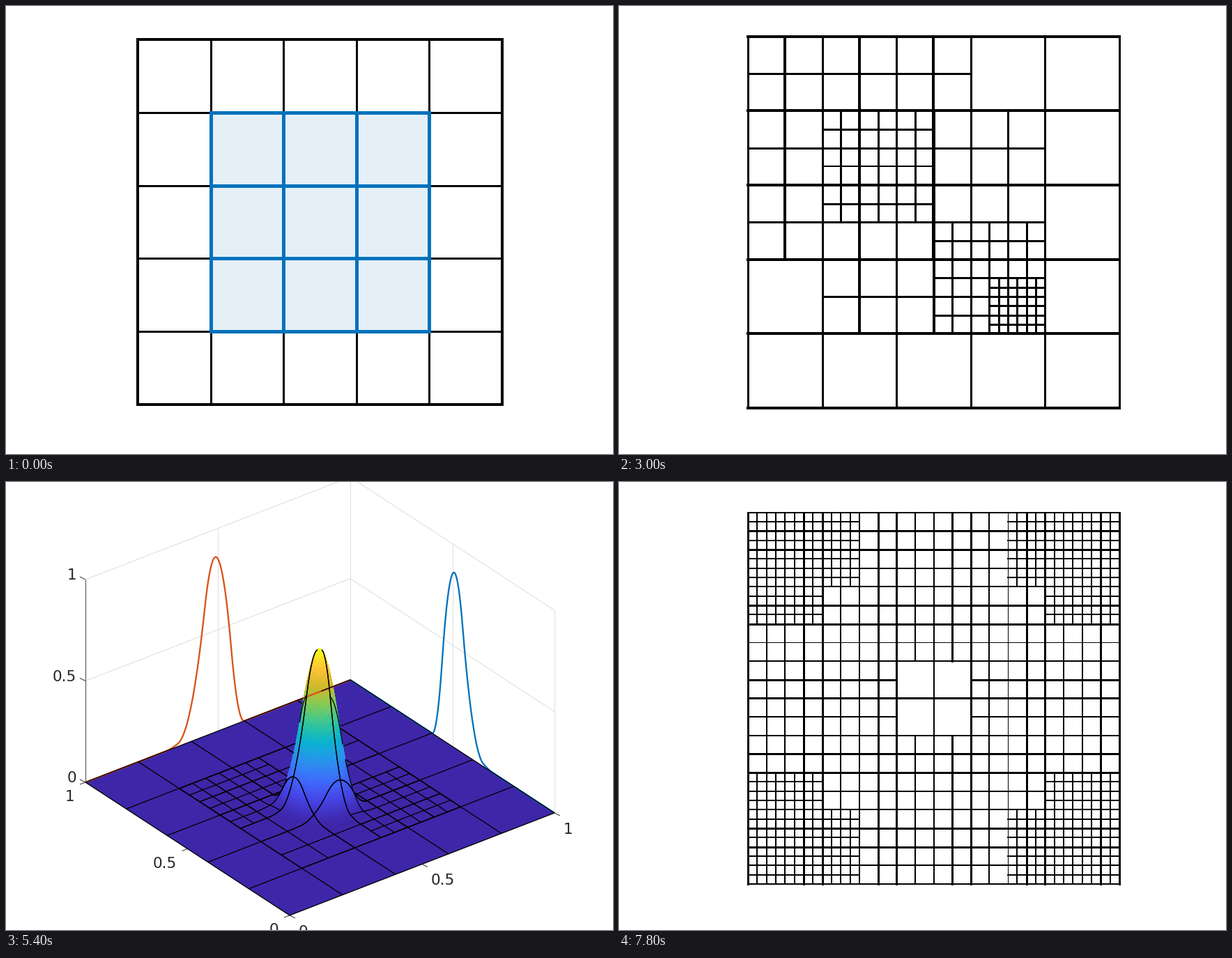
Recreate the animation shown at these times as a matplotlib script. Size 871 by 643 pixels, loop 8000 ms.

```python
import numpy as np
import matplotlib.pyplot as plt
from matplotlib.animation import FuncAnimation
from matplotlib.collections import LineCollection, PolyCollection
from matplotlib.colors import LinearSegmentedColormap
from matplotlib.patches import Rectangle

W, H, DPI = 871, 643, 64
PX = 72 / DPI                      # points per pixel
BLUE, ORANGE, INK = "#0072BD", "#D95319", "#262626"
PARULA = LinearSegmentedColormap.from_list("parula", [
    "#3E26A8", "#4746EB", "#3E70FF", "#2797EB", "#08B5D0",
    "#37C897", "#81CC59", "#D0BA27", "#FEC338", "#F9FB15"])

fig = plt.figure(figsize=(W / DPI, H / DPI), dpi=DPI, facecolor="white")
ax = fig.add_axes([0, 0, 1, 1])
ax.set_xlim(0, W)
ax.set_ylim(H, 0)
ax.axis("off")

# A mesh is a list of blocks: x0, y0, x1, y1, cell size (y runs down).
COARSE = [(0, 0, 1, 1, .2)]
ONCE = COARSE + [(.2, .2, .8, .8, .1)]
TWICE = ONCE + [(.2, .2, .5, .5, .05), (.5, .5, .8, .8, .05)]
THRICE = TWICE + [(0, 0, .6, .6, .1), (.65, .65, .8, .8, .025)]
TENTHS = [(0, 0, 1, 1, .1)]
RING = TENTHS + [(0, 0, 1, .4, .05), (0, .6, 1, 1, .05),
                 (0, .4, .4, .6, .05), (.6, .4, 1, .6, .05)]
CORNERS = RING + [
    (x, y, x + w, y + h, .025)
    for w, h in ((.3, .2), (.2, .3))
    for x in (0, 1 - w) for y in (0, 1 - h)]


def mesh_lines(blocks):
    """Yield (vertical, position, start, end) for every line of the blocks."""
    for x0, y0, x1, y1, step in blocks:
        for x in np.linspace(x0, x1, round((x1 - x0) / step) + 1):
            yield True, x, y0, y1
        for y in np.linspace(y0, y1, round((y1 - y0) / step) + 1):
            yield False, y, x0, x1


# Line weights, by position in fortieths of the square

def plain_width(vertical, k):
    return 4 if k in (0, 40) else 3


def mixed_width(vertical, k):
    if vertical:
        return 4 if k in (4, 12, 20) else 3
    return 2 if k == 14 else 4 if k % 8 == 0 else 3


def thin_width(vertical, k):
    if k == (28 if vertical else 14):
        return 1
    if k % 2:
        return 2
    return 3 if k // 2 % 4 in ((0, 3) if vertical else (1, 2)) else 2


def draw_mesh(blocks, width, box, marked=()):
    left, top, right, bottom = box

    def to_px(x, y):
        return left + x * (right - left), top + y * (bottom - top)

    def lines(parts, color, weight, z):
        segs, widths = [], []
        for vertical, p, a, b in mesh_lines(parts):
            ends = [(p, a), (p, b)] if vertical else [(a, p), (b, p)]
            segs.append([to_px(*e) for e in ends])
            widths.append(weight(vertical, round(p * 40)) * PX)
        return ax.add_collection(LineCollection(
            segs, colors=color, linewidths=widths, capstyle="projecting",
            zorder=z))

    out = [lines(blocks, "black", width, 2)]
    for block in marked:
        a, b = to_px(*block[:2]), to_px(*block[2:4])
        out.append(ax.add_patch(Rectangle(
            a, b[0] - a[0], b[1] - a[1], fc="#E5EFF8", ec="none", zorder=1)))
    if marked:
        out.append(lines(marked, BLUE, lambda v, k: 5, 3))
    return out


def spline(start, step, coefs):
    """Sum of quadratic B-splines on uniform knots."""
    def value(t):
        total = 0
        for i, c in enumerate(coefs):
            u = np.abs((t - start) / step - i - 1.5)
            total = total + c * np.where(
                u < .5, .75 - u ** 2, .5 * np.clip(1.5 - u, 0, None) ** 2)
        return total
    return value


class View:
    """Parallel projection of the unit cube."""

    def __init__(self, origin, ex, ey, rise, scale=1):
        mid = np.array([440, 320])
        self.o = mid + scale * (np.array(origin) - mid)
        self.ex, self.ey = scale * np.array(ex), scale * np.array(ey)
        self.rise = scale * rise
        toward = np.array([self.ey[0], -self.ex[0]])
        toward = toward / np.hypot(*toward)
        climb = -(self.ex[1] * toward[0] + self.ey[1] * toward[1]) / self.rise
        self.toward = toward[0], toward[1], -climb

    def __call__(self, x, y, z=0):
        x, y, z = np.broadcast_arrays(x, y, z)
        px = self.o[0] + self.ex[0] * x + self.ey[0] * y
        py = self.o[1] + self.ex[1] * x + self.ey[1] * y - self.rise * z
        return np.stack([px, py], -1)


def draw_surface(blocks, g, lo, hi, view):
    out = []
    dx, dy, dz = view.toward

    def line(pts, color, width, z):
        pts = np.asarray(pts)
        out.extend(ax.plot(pts[:, 0], pts[:, 1], color=color, lw=width * PX,
                           zorder=z, solid_capstyle="butt"))

    # walls
    for z in (.5, 1):
        line(view([0, 1, 1], [1, 1, 0], z), "#E2E2E2", 1.2, 1)
    for x, y in ((.5, 1), (1, 1), (1, .5), (1, 0)):
        line(view(x, y, [0, 1]), "#E2E2E2", 1.2, 1)
    line(view(0, 1, [0, 1]), "#606060", 1.2, 1)

    # ticks and labels
    def tick(p, mark, shift, text, align):
        line([p, p + np.array(mark)], "#505050", 1.2, 1)
        out.append(ax.text(p[0] + shift[0], p[1] + shift[1] + 8, text,
                           color=INK, size=21.5 * PX, ha=align,
                           va="baseline", family="DejaVu Sans"))

    for v, text in ((0, "0"), (.5, "0.5"), (1, "1")):
        tick(view(v, 0), (8, 4), (13, 22), text, "left")
        tick(view(0, v), (-8, 3), (-16, 19), text, "right")
        tick(view(0, 1, v), (-8, -4), (-13, -8), text, "right")

    # floor and peak, far cells first
    out.append(ax.add_collection(PolyCollection(
        [view([0, 1, 1, 0], [0, 0, 1, 1])], facecolors=PARULA(0.),
        edgecolors="none", zorder=2)))
    t = np.linspace(lo, hi, 71)
    x, y = np.meshgrid(t, t)
    z = g(x) * g(y)
    p = view(x, y, z)
    quads = np.stack([p[:-1, :-1], p[1:, :-1], p[1:, 1:], p[:-1, 1:]], 2)
    tone = (z[:-1, :-1] + z[1:, :-1] + z[1:, 1:] + z[:-1, 1:]) / 4 / z.max()
    order = np.argsort((x * dx + y * dy)[:-1, :-1].ravel())
    out.append(ax.add_collection(PolyCollection(
        quads.reshape(-1, 4, 2)[order], facecolors=PARULA(tone.ravel()[order]),
        edgecolors="face", linewidths=.5, zorder=3)))

    # profiles on the walls
    t = np.linspace(0, 1, 401)
    line(view(t, 1, g(t)), ORANGE, 2.3, 4)
    line(view(1, t, g(t)), BLUE, 2.3, 4)

    # mesh lines, left out where the peak is in front
    s = np.linspace(.008, .6, 150)[:, None]
    for vertical, p, a, b in mesh_lines(blocks):
        run = np.linspace(a, b, 2 + round(400 * (b - a)))
        x, y = (p + 0 * run, 1 - run) if vertical else (run, 1 - p + 0 * run)
        z = g(x) * g(y)
        front = g(x + s * dx) * g(y + s * dy)
        hidden = (front > z + s * dz + .002).any(0)
        pts = view(x, y, z)
        pts[hidden] = np.nan
        line(pts, "black", 1.3, 5)
    return out


SMALL = (189, 48, 712, 572)
LARGE = (185, 43.5, 718, 577)
CAMERA = (407, 622), (380, -147), (-293, -191), 291
LOW_CAMERA = (392, 575), (434, -110), (-335, -143), 282
wide = spline(.2, .2, [1])
narrow = spline(.3, .1, [1])
final = spline(.3, .05, [.03, .33, .92, .78])

scenes = [
    draw_mesh(COARSE, plain_width, SMALL, [(.2, .2, .8, .8, .2)]),
    draw_mesh(ONCE, plain_width, SMALL),
    draw_mesh(ONCE, mixed_width, LARGE,
              [(.2, .2, .5, .5, .1), (.5, .5, .8, .8, .1)]),
    draw_mesh(TWICE, mixed_width, LARGE),
    draw_mesh(TWICE, mixed_width, LARGE,
              [(0, 0, .6, .6, .2), (.65, .65, .8, .8, .05)]),
    draw_mesh(THRICE, mixed_width, LARGE),
    draw_mesh(THRICE, mixed_width, LARGE),
    draw_surface(COARSE, wide, .2, .8, View(*CAMERA, scale=.993)),
    draw_surface(ONCE, narrow, .3, .6, View(*CAMERA, scale=.996)),
    draw_surface(TWICE, final, .3, .6, View(*CAMERA)),
    draw_surface(THRICE, final, .3, .6, View(*LOW_CAMERA)),
    draw_mesh(TENTHS, thin_width, LARGE),
    draw_mesh(RING, thin_width, LARGE),
    draw_mesh(CORNERS, thin_width, LARGE),
]


def update(frame):
    current = frame // 3
    for i, scene in enumerate(scenes):
        for artist in scene:
            artist.set_visible(i == current)
    return []


anim = FuncAnimation(fig, update, frames=40, interval=200, repeat=True,
                     repeat_delay=0, blit=False)
plt.show()
```
